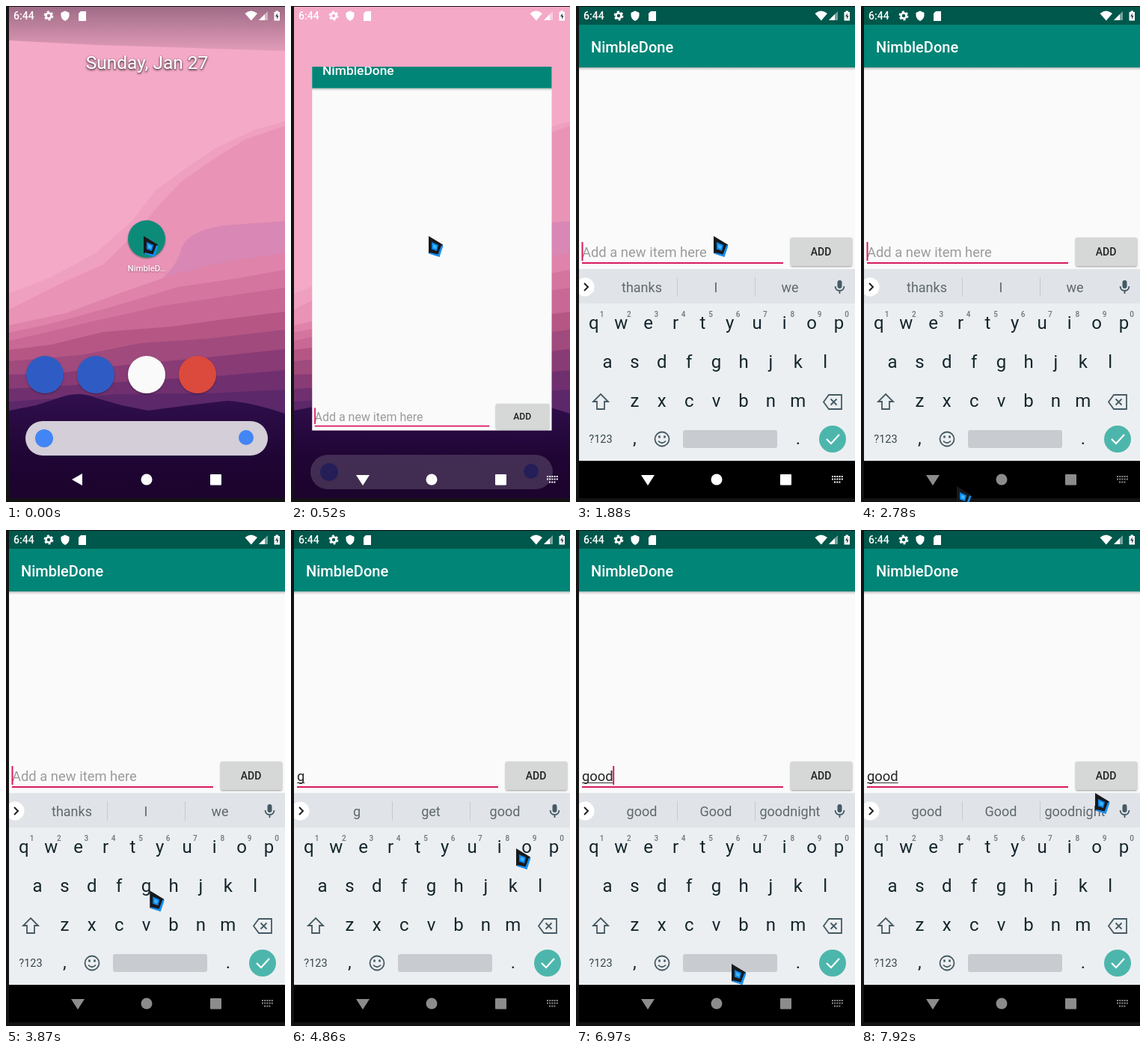
An HTML page for the animation above (8 s loop, 373 by 662 pixels).

```html
<!DOCTYPE html>
<html lang="en">
<head>
<meta charset="utf-8">
<title>To-do list demo</title>
<style>
html, body { margin: 0; height: 100%; overflow: hidden; background: #141314; }
svg { display: block; width: 100vw; height: 100vh; font-family: Roboto, "Open Sans", sans-serif; }
.mid { text-anchor: middle; }
.med { font-weight: 500; }
.line { fill: none; stroke: #455a64; stroke-width: 1.8; }
.date { text-shadow: 0 1px 3px #0009; }
</style>
</head>
<body>
<svg viewBox="0 0 373 662">
  <defs>
    <linearGradient id="scrim" x2="0" y2="1">
      <stop offset="0" stop-color="#5a3a52" stop-opacity=".55"/>
      <stop offset="1" stop-color="#5a3a52" stop-opacity=".12"/>
    </linearGradient>
    <linearGradient id="hill" x2="0" y2="1">
      <stop offset="0" stop-color="#310f4e"/>
      <stop offset=".6" stop-color="#1f0534"/>
      <stop offset="1" stop-color="#1b042c"/>
    </linearGradient>
    <linearGradient id="fall" x2="0" y2="1">
      <stop offset="0" stop-opacity=".25"/>
      <stop offset="1" stop-opacity="0"/>
    </linearGradient>
    <filter id="soft" x="-30%" y="-30%" width="160%" height="160%">
      <feDropShadow dx="0" dy="1" stdDeviation="1.2" flood-opacity=".4"/>
    </filter>
    <clipPath id="screen"><rect x="4" y="1" width="369" height="656"/></clipPath>
    <clipPath id="reveal"><rect id="window"/></clipPath>
  </defs>

  <g clip-path="url(#screen)">
    <g id="wall">
      <rect width="373" height="662" fill="#f4a9c7"/>
      <path fill="#ef9fc0" d="M373 154L330 166L280 190L240 217L200 246L170 285L120 330L60 362L4 384V662H373Z"/>
      <path fill="#e993b6" d="M373 160L320 178L275 206L235 234L205 265L180 296L130 345L70 372L4 405V662H373Z"/>
      <path fill="#d987b4" d="M373 287L290 293Q245 300 235 322Q230 345 210 362L373 340Z"/>
      <path fill="#df83aa" d="M373 330L300 340L225 358L150 384L80 410L4 426V662H373Z"/>
      <path fill="#d4759f" d="M373 352L300 365L230 375L140 402L60 424L4 436V662H373Z"/>
      <path fill="#c96895" d="M373 376L290 388L210 400L120 420L4 447V662H373Z"/>
      <path fill="#b55684" d="M373 408L300 417L220 428L130 435L60 452L4 459V662H373Z"/>
      <path fill="#a04a7d" d="M373 432L270 444L180 450L100 466L4 474V662H373Z"/>
      <path fill="#893b76" d="M373 458L260 470L150 480L70 490L4 492V662H373Z"/>
      <path fill="#70306f" d="M373 486L280 494L180 500L90 506L4 511V662H373Z"/>
      <path fill="#5c2869" d="M373 512L270 517L150 518L4 528V662H373Z"/>
      <path fill="url(#hill)" d="M4 540L40 533L80 520Q102 515 120 523L155 533L190 540L235 534L295 527Q325 528 373 544V662H4Z"/>
    </g>
    <path id="shade" fill="url(#scrim)" d="M4 1H373V60L250 56L120 52L4 46Z"/>

    <g id="home" filter="url(#soft)">
      <text class="mid date" x="188.5" y="84" font-size="24.5" fill="#fff">Sunday, Jan 27</text>
      <circle cx="188" cy="311" r="25" fill="#0f8b79"/>
      <text class="mid" x="188" y="354" font-size="11.5" fill="#fff">NimbleD…</text>
      <circle cx="52" cy="492" r="25" fill="#2f5cc4"/>
      <circle cx="120" cy="492" r="25" fill="#2f5cc4"/>
      <circle cx="188" cy="492" r="25" fill="#fafafa"/>
      <circle cx="256" cy="492" r="25" fill="#dc4a3c"/>
    </g>
    <g id="search">
      <rect x="26" y="554" width="324" height="46" rx="23" fill="#d3ced8"/>
      <circle cx="51" cy="577" r="12" fill="#4285f4"/>
      <circle cx="321" cy="576" r="10" fill="#4285f4"/>
    </g>

    <g clip-path="url(#reveal)">
      <g id="app">
        <rect x="4" y="1" width="369" height="607" fill="#fafafa"/>
        <rect x="4" y="82" width="369" height="4" fill="url(#fall)"/>
        <rect x="4" y="1" width="369" height="81" fill="#008577"/>
        <rect x="4" y="1" width="369" height="24" fill="#00574b"/>
        <text class="med" x="20" y="62" font-size="20" fill="#fff">NimbleDone</text>
        <g id="row">
          <text id="hint" x="8" y="335" font-size="18.4" fill="#9b9b9b">Add a new item here</text>
          <text id="entry" x="8" y="335" font-size="18.4" fill="#242424"></text>
          <rect id="under" x="8" y="337" height="1" fill="#333"/>
          <rect x="8" y="342" width="269" height="2" fill="#d81b60"/>
          <rect id="caret" y="315" width="2" height="25" fill="#d81b60"/>
          <rect x="287" y="309" width="82" height="38" rx="2" fill="#d6d7d7" filter="url(#soft)"/>
          <text class="mid med" x="327.5" y="333" font-size="14" fill="#202020">ADD</text>
        </g>
      </g>
    </g>

    <g id="keyboard">
      <rect x="4" y="351" width="369" height="257" fill="#eceff1"/>
      <rect x="4" y="351" width="369" height="46" fill="#e0e4e8"/>
      <circle cx="12" cy="375" r="12.5" fill="#fff"/>
      <path d="M11 370L16 375L11 380" fill="none" stroke="#222" stroke-width="2"/>
      <path d="M135.5 362V388M239.5 362V388" stroke="#c5cbd0"/>
      <g id="words" class="mid" font-size="18" fill="#5f686d"><text x="88" y="382"/><text x="187" y="382"/><text x="286" y="382"/></g>
      <rect x="349.5" y="366" width="6" height="11" rx="3" fill="#455a64"/>
      <path class="line" d="M346.5 374Q347 380 352.5 380T358.5 374M352.5 380V384"/>
      <g id="keys" class="mid" fill="#14262d"></g>
      <path class="line" d="M33 518L43 528H38V538H28V528H23Z"/>
      <path class="line" d="M338 519H355V538H338L331 528.5ZM340.5 524.5L348.5 532.5M348.5 524.5L340.5 532.5"/>
      <circle class="line" cx="115" cy="578" r="9.5"/>
      <path class="line" d="M110 580.5Q115 586 120 580.5"/>
      <path d="M111.5 573.5V576.5M118.5 573.5V576.5" stroke="#455a64" stroke-width="2.6"/>
      <rect x="143" y="566" width="126" height="24" rx="3" fill="#c8ccd0"/>
      <circle cx="343" cy="578" r="18" fill="#4db6ac"/>
      <path d="M335 578L341 584L352 572" fill="none" stroke="#fff" stroke-width="2.2"/>
    </g>

    <rect id="navbar" x="4" y="607" width="369" height="50"/>
    <g id="nav" fill="#fff">
      <path id="back"/>
      <circle cx="188" cy="632" r="7.5"/>
      <rect x="273" y="625" width="15" height="14.5" rx="1"/>
      <path id="ime" d="M342 628H357M342 631.5H357M345 635.5H354" fill="none" stroke="#fff" stroke-width="2.2" stroke-dasharray="2 1.2"/>
    </g>

    <g id="status" fill="#fff">
      <text x="10" y="18" font-size="14" class="med">6:44</text>
      <circle cx="57" cy="13" r="5.4" fill="none" stroke="#fff" stroke-width="2" stroke-dasharray="3 2.65"/>
      <circle cx="57" cy="13" r="3.5" fill="none" stroke="#fff" stroke-width="2.6"/>
      <path d="M79 6.5L84.5 9V13Q84 17.5 79 20Q74 17.5 73.5 13V9Z"/>
      <path d="M100 7H107V20H97V10Z"/>
      <path d="M319.5 10Q327.5 3 336 10L327.8 19.5Z"/>
      <path d="M338 19L350 7V19Z" opacity=".45"/>
      <path d="M338 19L346 11V19Z"/>
      <path d="M358.5 8H360.5V6.5H364V8H366V19.5H358.5Z"/>
      <path d="M363 9.5L360 14H362V18L364.5 13H362.7Z" fill="#345"/>
    </g>

    <g id="popup">
      <rect x="-20" y="-93" width="40" height="115" rx="2" fill="#dadcdd" filter="url(#soft)"/>
      <text class="mid" y="-54" font-size="27" fill="#37474f"></text>
    </g>
  </g>

  <g id="cursor">
    <path d="M0 -1L19 10.5L14 26.5L0 22Z" fill="#17191d"/>
    <path d="M1 21L12.5 23.5L17 11.5L19.5 12L14.5 27L2 23Z" fill="#1590f5"/>
    <path d="M4 7L13 11L11 19L4 16.5Z" fill="#0a85e8"/>
    <path d="M6 10L11 12.2L10 16.5L6 15Z" fill="#3db4ff"/>
  </g>
</svg>
<script>
const $ = id => document.getElementById(id);
const set = (el, attrs) => { for (const k in attrs) el.setAttribute(k, attrs[k]); };
const clamp = v => Math.max(0, Math.min(1, v));
const LOOP = 8000, GAP = 36.4;

const ticks = [0, 400, 520, 670, 820, 950, 1090, 1230, 1370,
  1490, 1620, 1750, 1870, 2000, 2130, 2250, 2380, 2510,
  2630, 2780, 2910, 3040, 3170, 3300, 3430, 3560,
  3720, 3870, 4010, 4160, 4300, 4450, 4600, 4740, 4860, 5140,
  5440, 5580, 5730, 5870, 6020, 6160, 6280, 6430,
  6550, 6690, 6830, 6970, 7250, 7390, 7520, 7660, 7790, 7920];

// time, x, y of the pointer tip
const path = [[0, 184, 308], [1900, 184, 308], [2510, 140, 608], [2780, 128, 642],
  [2910, 134, 636], [3300, 212, 545], [3560, 196, 484], [4300, 187, 480],
  [4740, 300, 425], [4860, 301, 426], [5580, 301, 426], [6020, 113, 474],
  [6160, 114, 473], [6430, 190, 584], [6550, 213, 595], [6970, 208, 580],
  [7250, 236, 560], [7520, 350, 430], [7660, 353, 385], [7790, 332, 356], [7920, 313, 352]];

// key presses: start, popup end, key centre, text after, suggestions
const presses = [
  { t: 500, end: 0, text: "", words: "thanks I we" },
  { t: 4220, end: 4440, x: 187, y: 475, text: "g", words: "g get good" },
  { t: 5140, end: 5440, x: 315, y: 424, text: "go", words: "go good going" },
  { t: 5440, end: 5650, x: 315, y: 424, text: "goo", words: "goo good goof" },
  { t: 5960, end: 6270, x: 115, y: 475, text: "good", words: "good Good goodnight" }];

const label = (s, x, y, size, extra = "") => `<text x="${x}" y="${y}" font-size="${size}" ${extra}>${s}</text>`;
const keyRow = (s, x, y) => [...s].map((c, i) => label(c, x + i * GAP, y, 24)).join("");
$("keys").innerHTML = keyRow("qwertyuiop", 23.8, 431) + keyRow("asdfghjkl", 42, 483) +
  keyRow("zxcvbnm", 78.4, 535) + keyRow(",", 78.4, 585) + keyRow(".", 297, 585) +
  label("?123", 33, 583, 14.5, 'fill="#37474f"') +
  [..."1234567890"].map((c, i) => label(c, 34.5 + i * GAP, 415, 10, 'class="med" fill="#6a767c"')).join("");

function pointer(t) {
  const i = path.findIndex(k => k[0] > t);
  if (i < 0) return path[path.length - 1].slice(1);
  const [a, b] = [path[i - 1], path[i]], u = (t - a[0]) / (b[0] - a[0]);
  return [1, 2].map(k => a[k] + (b[k] - a[k]) * u);
}

function openApp(t) {
  const p = 1 - (1 - clamp((t - 380) / 300)) ** 3;
  const left = 163 - 159 * p, width = 50 + 319 * p;
  const bottom = 336 + 272 * p, top = 286 - 285 * p * p, s = width / 369;
  set($("window"), { x: left, y: top, width, height: bottom - top });
  set($("app"), { transform: `translate(${left - 4 * s} ${bottom - 608 * s}) scale(${s})`, opacity: clamp(p * 4) });
  set($("home"), { opacity: clamp(1 - 2 * p) });
  set($("search"), { opacity: 1 - 0.95 * p, transform: `translate(0 ${53 * p})` });
  set($("shade"), { opacity: clamp(1 - 1.2 * p) });
  set($("navbar"), { opacity: p > 0.99 ? 1 : 0 });
  const slide = 1 - clamp((t - 620) / 180);
  set($("keyboard"), { transform: `translate(0 ${320 * slide * slide})` });
  set($("row"), { transform: `translate(0 ${t < 700 ? 258 : 0})` });
}

function typeText(t) {
  const now = presses.filter(p => p.t <= t).pop() || presses[0];
  $("entry").textContent = now.text;
  const len = now.text ? $("entry").getComputedTextLength() : 0;
  set($("hint"), { opacity: now.text ? 0 : 1 });
  set($("under"), { width: len });
  set($("caret"), { x: 7.5 + len, opacity: (t - now.t + LOOP) % 1000 < 500 ? 1 : 0 });
  now.words.split(" ").forEach((w, i) => $("words").children[i].textContent = w);
  const held = t < now.end;
  set($("popup"), { opacity: held ? 1 : 0, transform: `translate(${now.x || 0} ${now.y || 0})` });
  $("popup").lastElementChild.textContent = now.text.slice(-1);
}

function draw(ms) {
  const time = ms % LOOP, t = ticks.filter(k => k <= time).pop();
  openApp(t);
  typeText(t);
  const ime = t >= 500;
  set($("back"), { d: ime ? "M87 626H105L96 640Z" : "M88 632L102 624V640Z" });
  set($("ime"), { opacity: ime ? 1 : 0 });
  set($("nav"), { opacity: 1 - 0.45 * clamp((t - 1900) / 400) });
  set($("cursor"), { transform: `translate(${pointer(t)})` });
}

const start = performance.now();
function frame() {
  draw(performance.now() - start);
  requestAnimationFrame(frame);
}
frame();
</script>
</body>
</html>
```
